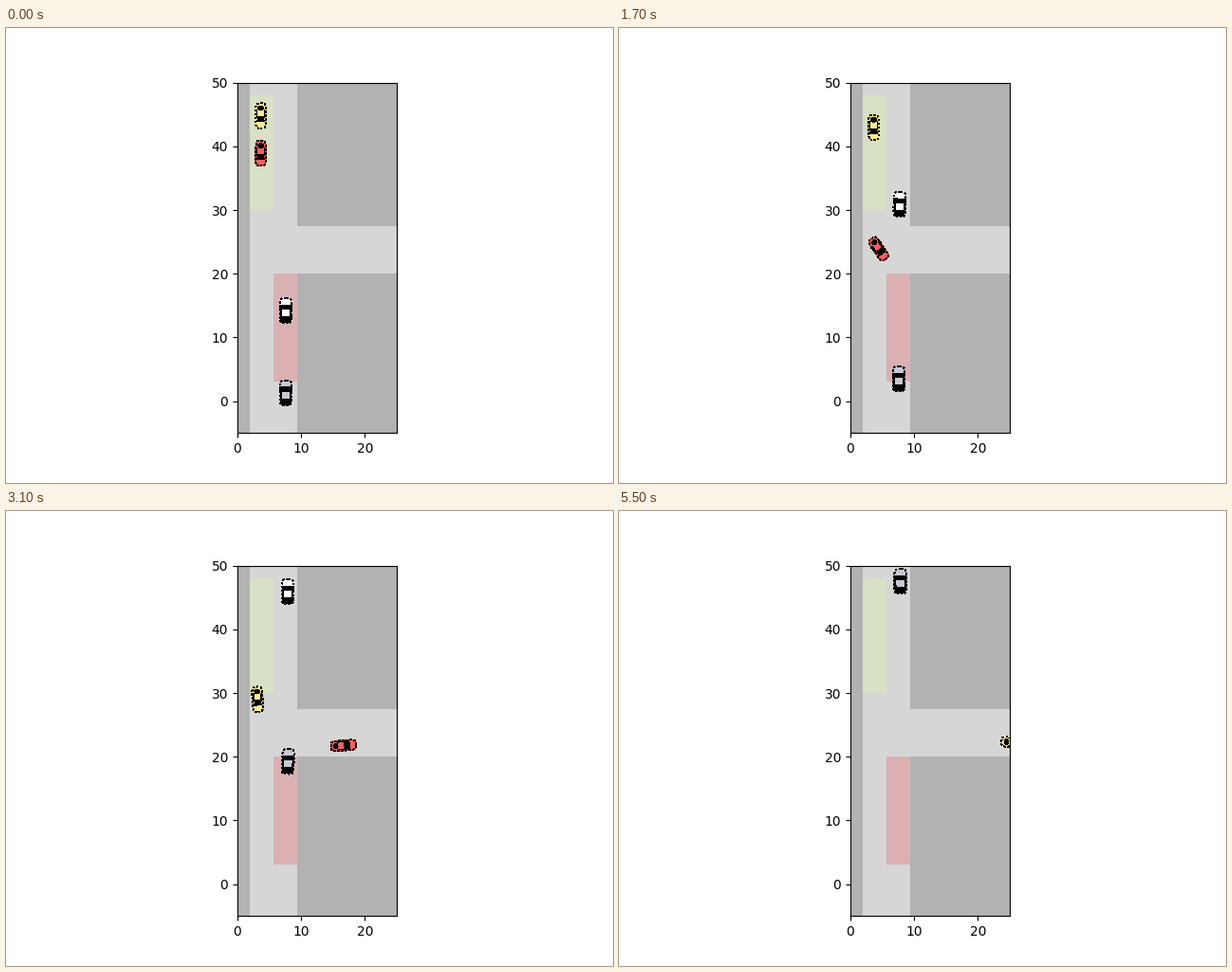
These frames come from a looping animation (640x480 px, 5600 ms). A matplotlib script:

```python
import numpy as np
import matplotlib.pyplot as plt
from matplotlib.animation import FuncAnimation
from matplotlib.patches import Polygon, Rectangle
from matplotlib.transforms import Affine2D

FRAMES, INTERVAL = 56, 100
LANE = 3.75
LEFT = LANE / 2
MID, RIGHT = LEFT + LANE, LEFT + 2 * LANE

fig = plt.figure(figsize=(6.4, 4.8), dpi=100)
ax = fig.add_subplot()
ax.set_aspect("equal")
ax.set_xlim(0, 25)
ax.set_ylim(-5, 50)
ax.set_xticks([0, 10, 20])
ax.set_yticks(range(0, 51, 10))
ax.set_facecolor("#b2b2b2")


def area(x0, x1, y0, y1, color):
    ax.add_patch(Rectangle((x0, y0), x1 - x0, y1 - y0, fc=color, lw=0))


area(LEFT, RIGHT, -5, 50, "#d6d6d6")
area(RIGHT, 25, 20, 27.5, "#d6d6d6")
area(LEFT, MID, 30, 48, "#d8e0c5")
area(MID, RIGHT, 3, 20, "#dbb0b3")


class Route:
    """Smooth curve through waypoints, measured by distance along it."""

    def __init__(self, *points):
        self.p = np.array(points, float)
        steps = np.hypot(*np.diff(self.p, axis=0).T)
        self.s = np.append(0, np.cumsum(steps))
        self.m = np.gradient(self.p, self.s, axis=0)

    def pos(self, s):
        if s >= self.s[-1]:
            return self.p[-1] + self.m[-1] * (s - self.s[-1])
        i = np.searchsorted(self.s, s, side="right") - 1
        h = self.s[i + 1] - self.s[i]
        u = (s - self.s[i]) / h
        return ((1 + 2 * u) * (1 - u) ** 2 * self.p[i]
                + u * (1 - u) ** 2 * h * self.m[i]
                + u * u * (3 - 2 * u) * self.p[i + 1]
                + u * u * (u - 1) * h * self.m[i + 1])


def turn(y0, sway):
    """Down the left lane, then left into the side road."""
    return Route((3.65, y0), (3.6, 36), (3.15, 29), (3.6, 25.5),
                 (4.8, 23.4), (8.8, 21), (16.4, sway), (25.2, 22.3))


def rounded(length, width, power=0.42):
    a = np.linspace(0, 2 * np.pi, 60, endpoint=False)
    c, s = np.cos(a), np.sin(a)
    return np.column_stack([length / 2 * np.sign(c) * abs(c) ** power,
                            width / 2 * np.sign(s) * abs(s) ** power])


def window(x0, x1, w0, w1, y=0):
    return [(x0, y - w0), (x1, y - w1), (x1, y + w1), (x0, y + w0)]


class Car:
    """Top view pointing along +x; drives off with gentle acceleration."""

    def __init__(self, route, color, start, speed, accel):
        self.route, self.start = route, start
        self.speed, self.accel = speed, accel
        self.parts = []
        self.color = color

    def add(self, pts, fc="black", **line):
        part = Polygon(pts, fc=fc, antialiased=False, zorder=1.5,
                       **{"lw": 0, **line})
        self.parts.append(ax.add_patch(part))

    def body(self, width):
        self.add(rounded(4, width), self.color)
        self.add(rounded(3.9, width - 0.1), "none", ec="black", lw=0.6,
                 ls=(0, (2, 2.5)))

    def coupe(self):
        self.body(1.7)
        self.add(rounded(0.65, 0.8, 0.7) + [-1.2, 0])
        self.add(window(0.15, 0.95, 0.42, 0.58))
        for side in (-1, 1):
            self.add(window(-0.9, 0.3, 0.05, 0.05, side * 0.6))
        return self

    def saloon(self):
        self.body(2)
        self.add(window(-0.9, 0.9, 0.85, 0.92))
        self.add(window(-1.85, -0.9, 0.7, 0.9))
        self.add(window(-0.75, 0.1, 0.52, 0.58), self.color)
        return self

    def place(self, frame):
        t = max(frame - self.start, 0)
        s = self.speed * t + self.accel * t * t
        x, y = self.route.pos(s)
        dx, dy = self.route.pos(s + 0.05) - (x, y)
        move = Affine2D().rotate(np.arctan2(dy, dx)).translate(x, y)
        for part in self.parts:
            part.set_transform(move + ax.transData)


white_route = Route((7.59, 14.2), (7.59, 25), (7.88, 37), (7.9, 46))
gray_route = Route((7.59, 1.28), (7.59, 10), (8.18, 28), (7.85, 40), (7.83, 50))

cars = [
    Car(white_route, "#ffffff", 0, 0.93, 0.003).saloon(),
    Car(gray_route, "#c8c8d2", 15, 1.1, 0.0014).saloon(),
    Car(turn(44.8, 22.8), "#fde992", 15, 0.92, 0.0042).coupe(),
    Car(turn(38.9, 21.75), "#f7605f", 0, 0.87, 0.0015).coupe(),
]


def update(frame):
    for car in cars:
        car.place(frame)
    return [part for car in cars for part in car.parts]


anim = FuncAnimation(fig, update, frames=FRAMES, interval=INTERVAL,
                     init_func=lambda: update(0), repeat=True,
                     repeat_delay=0, blit=False)
plt.show()
```
